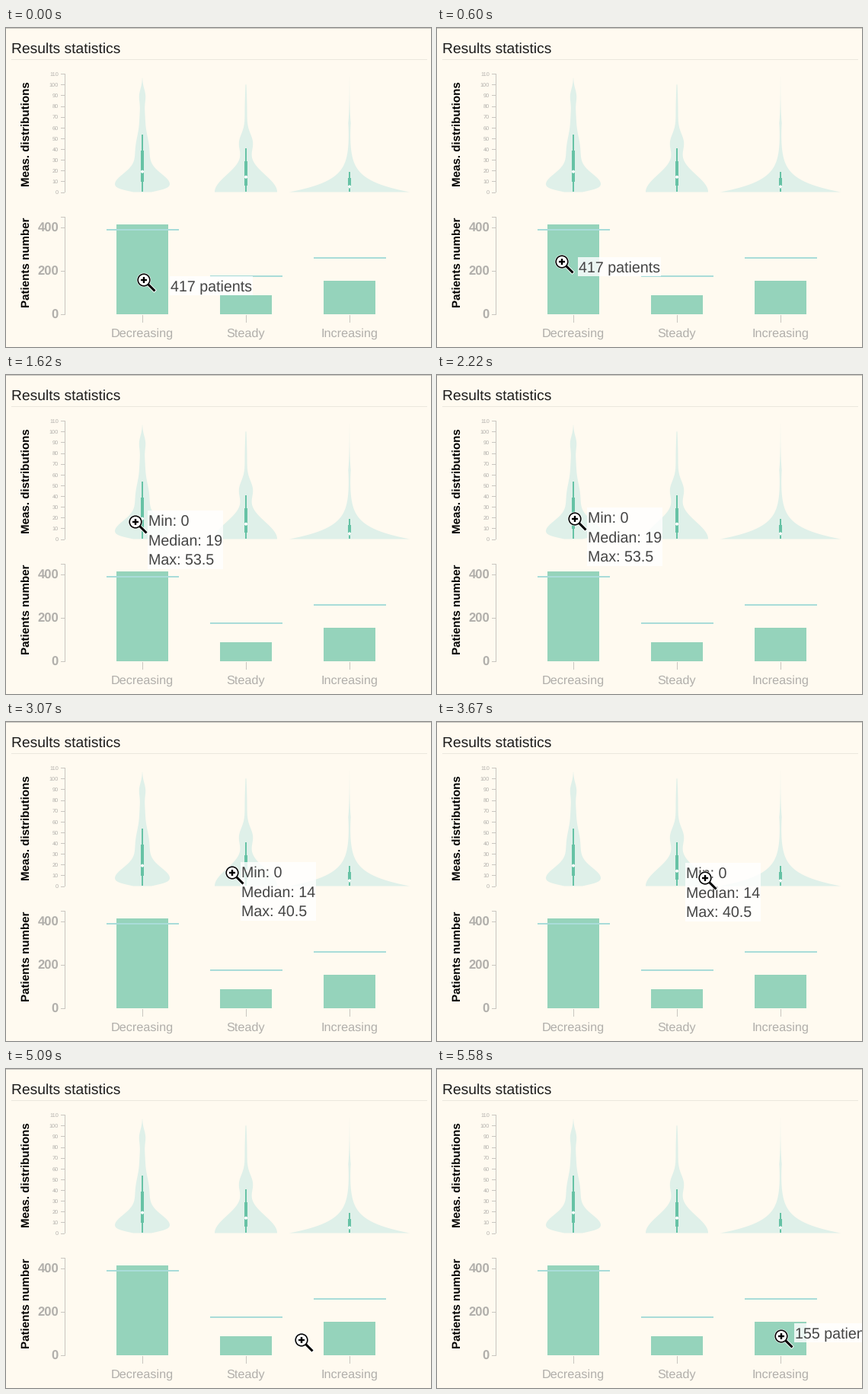
These frames come from a looping animation (558 by 419 pixels, 5690 ms). A matplotlib script:

```python
import numpy as np
import matplotlib.pyplot as plt
from matplotlib.animation import FuncAnimation
from matplotlib.patches import Circle, Polygon, Rectangle

W, H = 558, 419
LOOP, TICK = 5690, 10
CREAM, AXIS, GREY = "#fffaf0", "#c9c6c0", "#b1afab"
BAR, REF, VIOLIN, BOX = "#95d3bb", "#a9dcd9", "#dff0e9", "#66c2a5"

plt.rcParams["font.family"] = "Liberation Sans"
plt.rcParams["text.hinting"] = "none"

# At 72 dpi one point equals one pixel.
fig = plt.figure(figsize=(W / 72, H / 72), dpi=72, facecolor=CREAM)


def stage():
    ax = fig.add_axes([0, 0, 1, 1])
    ax.set(xlim=(0, W), ylim=(H, 0))
    ax.axis("off")
    return ax


def rect(ax, x0, y0, x1, y1, color, **kw):
    return ax.add_patch(Rectangle((x0, y0), x1 - x0, y1 - y0, fc=color, lw=0, **kw))


def label(ax, x, y, text, size, color, **kw):
    return ax.text(x, y, text, fontsize=size, color=color, va="baseline", **kw)


# ---------- data ----------

class Group:
    def __init__(self, name, cx, count, mean, quartiles, top, tail, power, humps):
        self.name, self.cx, self.count, self.mean = name, cx, count, mean
        self.q1, self.median, self.q3 = quartiles
        self.top, self.tail, self.power, self.humps = top, tail, power, humps

    def half_width(self, v):
        """Half width of the violin at value v: a sum of (size, centre, spread) humps."""
        return sum(a * np.exp(-(abs(v - c) / s) ** self.power)
                   for a, c, s in self.humps)

    def hover(self, x, y):
        dx, v = abs(x - self.cx), (BASE - y) / SCALE
        if dx < 34 and count_y(self.count) < y < 376:
            return [f"{self.count} patients"]
        if 4 < v < self.tail and dx < self.half_width(v) + 6:
            return ["Min: 0", f"Median: {self.median}", f"Max: {self.top}"]
        return []


GROUPS = [
    Group("Decreasing", 179, 417, 390, (9.5, 19, 38.5), 53.5, 106, 2,
          [(35, 6.7, 15), (-22, -2, 4), (9, 39, 22), (2.5, 73, 14), (3.5, 90, 9)]),
    Group("Steady", 315, 88, 176, (6, 14, 28.5), 40.5, 100, 2,
          [(41, 0, 23), (8, 46, 12), (1.5, 75, 25)]),
    Group("Increasing", 451, 155, 259, (4, 5, 13), 18.5, 107, 1,
          [(79, 0, 10.6), (1.5, 64, 12)]),
]

BASE, SCALE = 215.5, 1.412


def meas_y(v):
    return BASE - v * SCALE


def count_y(v):
    return 376 - v * 0.284


# ---------- static chart ----------

def draw_violin(ax, g):
    v = np.linspace(0, g.tail, 220)
    w, y, cx = g.half_width(v), meas_y(v), g.cx
    outline = np.c_[np.r_[cx - w, cx + w[::-1]], np.r_[y, y[::-1]]]
    ax.add_patch(Polygon(outline, fc=VIOLIN, lw=0))
    rect(ax, cx - 1, round(meas_y(g.top)), cx + 1, 215, BOX)
    rect(ax, cx - 2, round(meas_y(g.q3)), cx + 2, round(meas_y(g.q1)), BOX)
    ax.add_patch(Circle((cx, meas_y(g.median)), 2, fc="white", lw=0))


def draw_axis(ax, top, bottom, ticks, to_y):
    rect(ax, 77, top, 78, bottom, AXIS)
    for v in ticks:
        y = round(to_y(v))
        rect(ax, 72, y, 77, y + 1, AXIS)


def draw_chart(ax):
    rect(ax, 0, 0, W, 1, "#c8c5bf")
    label(ax, 7, 33, "Results statistics", 19.3, "#1c1c1c")
    rect(ax, 7, 41, 553, 42, "#ebe7de")

    draw_axis(ax, 60, 216, range(0, 111, 10), meas_y)
    for v in range(0, 111, 10):
        label(ax, 69, meas_y(v) + 2.7, str(v), 7.4, GREY, ha="right")
    draw_axis(ax, 248, 377, (0, 200, 400, 450), count_y)
    for v in (0, 200, 400):
        label(ax, 69, round(count_y(v)) + 6, str(v), 16.6, GREY,
              ha="right", weight="bold")

    for y, text in ((139, "Meas. distributions"), (307.5, "Patients number")):
        label(ax, 32, y, text, 15.1, "black", ha="center", weight="bold",
              rotation=90, rotation_mode="anchor")

    for g in GROUPS:
        cx, ref = g.cx, round(count_y(g.mean))
        draw_violin(ax, g)
        rect(ax, cx - 34, round(count_y(g.count)), cx + 34, 376, BAR)
        rect(ax, cx - 47, ref - 1, cx + 48, ref + 1, REF)
        rect(ax, cx, 377, cx + 1, 387, AXIS)
        label(ax, cx, 406, g.name, 16.3, GREY, ha="center")


# Flatten the chart once so that each frame only redraws the pointer.
draw_chart(stage())
fig.canvas.draw()
backdrop = np.array(fig.canvas.buffer_rgba())
fig.clear()
fig.figimage(backdrop, zorder=-1)
ax = stage()

# ---------- motion ----------

STEP = 100          # the pointer advances in steps of this many ms
REST = (16, -15)    # usual tooltip offset; a fast pointer shifts it

# Moves: first step, last step, goal x, y and the tooltip offset there
START = (181, 331, 34, -5)
MOVES = [
    (100, 200, 164, 315, 21, -5),
    (600, 1120, 168, 210, *REST),
    (1220, 1320, 167, 195, *REST),
    (1620, 1820, 177, 189, *REST),
    (2220, 2220, 181, 189, *REST),
    (2770, 3070, 297, 198, 11, -14),
    (3170, 3270, 301, 192, *REST),
    (3570, 3670, 352, 205, -26, -20),
    (3770, 3990, 424, 204, *REST),
    (4290, 4590, 332, 359, 21, -16),
    (4690, 4790, 327, 361, *REST),
    (4890, 5380, 450, 352, *REST),
    (5480, 5580, 452, 351, 17, -17),
]


def progress(t, first, last):
    """Eased share of a move done at time t, in whole steps."""
    if t >= last:
        return 1
    count = round((last - first) / STEP) + 1
    u = min((t - first) // STEP + 1, count - 1) / count
    return u * u * (3 - 2 * u)


def pose(t):
    now = np.array(START, float)
    for first, last, *goal in MOVES:
        if t >= first:
            now += (np.array(goal) - now) * progress(t, first, last)
    return np.rint(now)


# ---------- moving parts ----------

LINE = 26
panel = rect(ax, 0, 0, 1, 1, "white", alpha=0.82, zorder=2)
rows = [label(ax, 0, 0, "", 19.6, "#444444", zorder=3) for _ in range(3)]

halo = ax.add_patch(Circle((0, 0), 9.2, fc="white", lw=0, zorder=4))
handle_rim, = ax.plot([], [], color="white", lw=4.8, zorder=4)
handle, = ax.plot([], [], color="black", lw=3, solid_capstyle="butt", zorder=5)
lens = ax.add_patch(Circle((0, 0), 7.8, fc="white", ec="black", lw=1.6, zorder=6))
plus, = ax.plot([], [], color="black", lw=2.4, solid_capstyle="butt", zorder=7)


def place_pointer(x, y):
    halo.center = lens.center = (x, y)
    for line, end in ((handle_rim, 13.5), (handle, 14.5)):
        line.set_data([x + 5, x + end], [y + 5, y + end])
    plus.set_data([x - 4, x + 4, np.nan, x, x],
                  [y, y, np.nan, y - 4, y + 4])


def place_tip(lines, x, y):
    width = 0
    for i, row in enumerate(rows):
        row.set_text(lines[i] if i < len(lines) else "")
        row.set_position((x + 1, y + 20 + LINE * i))
        if row.get_text():
            width = max(width, row.get_window_extent().width)
    panel.set_visible(bool(lines))
    panel.set_bounds(x, y, width + 2, LINE * len(lines) - 1)


def update(i):
    x, y, dx, dy = pose(i * TICK)
    place_pointer(x, y)
    place_tip(sum((g.hover(x, y) for g in GROUPS), []), x + dx, y + dy)
    return [panel, *rows, halo, handle_rim, handle, lens, plus]


anim = FuncAnimation(fig, update, frames=LOOP // TICK, interval=TICK,
                     init_func=lambda: update(0), repeat=True, repeat_delay=0)
plt.show()
```
